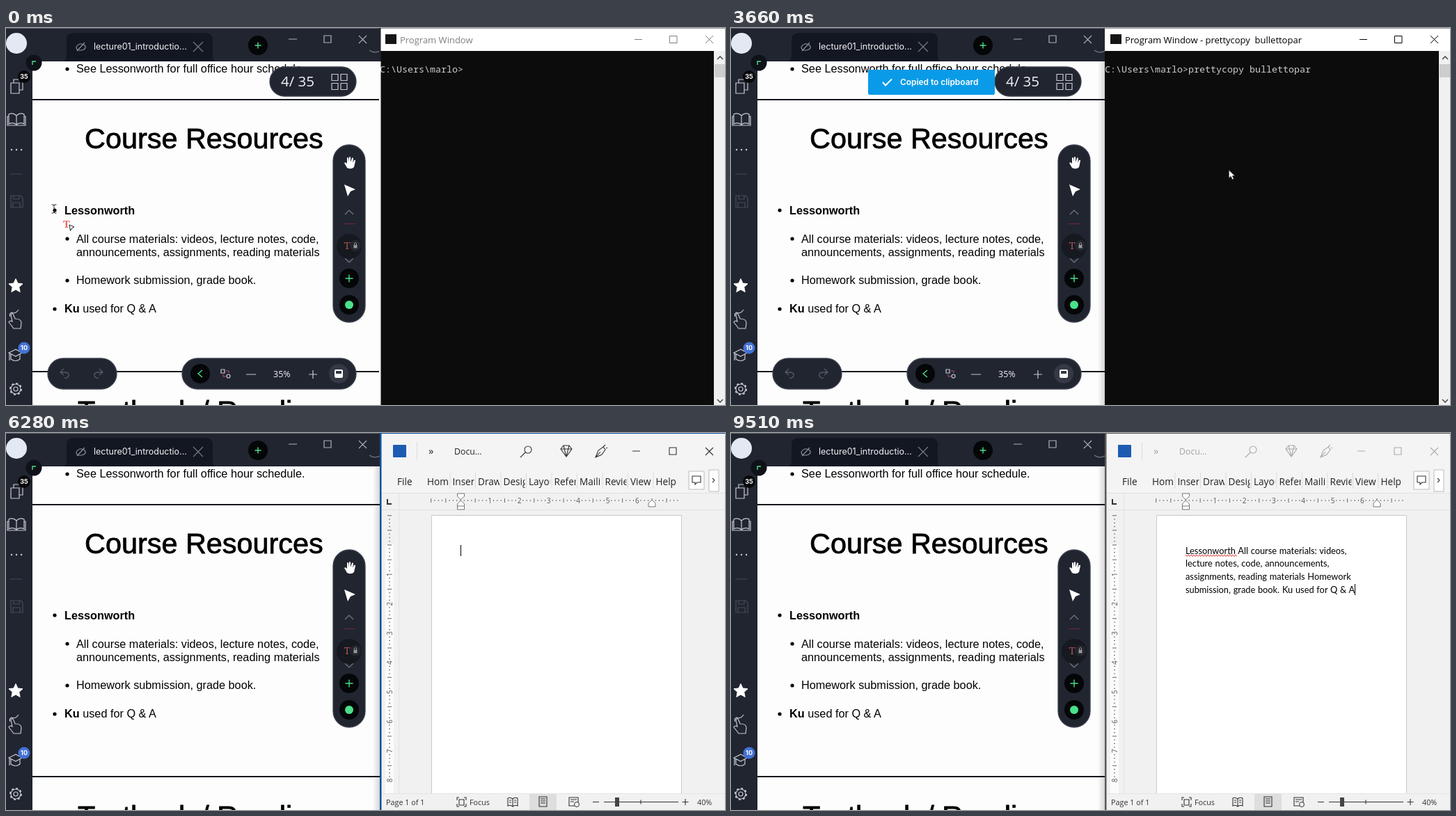
An HTML page that plays this animation: 1033x542 px, repeating every 9530 ms.

```html
<!DOCTYPE html>
<html lang="en">
<head>
<meta charset="utf-8">
<title>Bullets to paragraph</title>
<style>
html,body{margin:0;width:100%;height:100%;overflow:hidden;background:#fff}
svg{display:block}
text{white-space:pre}
.ui{font-family:"Open Sans","Noto Sans",sans-serif}
.slide{font:16.26px "Liberation Sans",Arial,sans-serif;fill:#000}
.mono{font:13.333px "Noto Sans Mono",monospace;fill:#ccc}
.doc{font:12.8px Lato,sans-serif;word-spacing:.5px}
.b{font-weight:700}
.u{text-decoration:underline}
.l{fill:none;stroke:#c6c9d0;stroke-width:1.2}
.d{fill:none;stroke:#333;stroke-width:1.1}
.dim{fill:none;stroke:#565b67;stroke-width:1.3}
.faint{stroke:#464b56}
.off{stroke:#aaa}
.g{fill:none;stroke:#4be08b;stroke-width:1.4}
.pill{fill:#212530;stroke:#3a3f4b;stroke-width:1.3}
.m{text-anchor:middle}
</style>
</head>
<body>
<svg id="stage" width="100%" height="100%" viewBox="0 0 1033 542">
<defs>
  <linearGradient id="fade"><stop offset="0" stop-opacity="0"/><stop offset="1" stop-opacity=".16"/></linearGradient>
  <filter id="soft" x="-10%" y="-10%" width="120%" height="120%"><feDropShadow dx="0" dy="1" stdDeviation="2" flood-opacity=".3"/></filter>
  <path id="chev" d="M-3-1.5L0 1.5L3-1.5"/>
</defs>

<!-- slide viewer -->
<rect width="539" height="542" fill="#fdfdfd"/>
<g class="slide">
  <path d="M38 103H537M38 494H537" stroke="#14171c" stroke-width="2.2"/>
  <text x="101" y="64">See Lessonworth for full office hour schedule.</text>
  <g font-size="41.4" stroke="#000" stroke-width=".8"><text x="113" y="173">Course Resources</text><text x="103" y="564.5">Textbook / Reading</text></g>
  <text x="84" y="268" class="b">Lessonworth</text>
  <text x="101" y="308.5">All course materials: videos, lecture notes, code,</text>
  <text x="101" y="328">announcements, assignments, reading materials</text>
  <text x="101" y="368">Homework submission, grade book.</text>
  <text x="84" y="409"><tspan class="b">Ku</tspan> used for Q &amp; A</text>
  <g id="dots"></g>
</g>
<g id="sel" fill="#5ca0cb" fill-opacity=".35"></g>
<rect id="shade" x="527" y="48" width="10" height="494" fill="url(#fade)"/>

<!-- viewer frame -->
<path d="M0 0H539V48H38V542H0Z" fill="#212530"/>
<path d="M0 .5H539" stroke="#5b5f68"/>
<path d="M82 48Q87 47 87 40V17Q87 7 97 7H286Q297 7 297 17V40Q297 47 302 48Z" fill="#131722"/>
<circle cx="15" cy="22" r="15" fill="#e3e9f3"/>
<circle cx="40" cy="50" r="11.5" fill="#0f1218"/>
<path class="g" d="M38 53V48H43"/>
<text x="126" y="31" font-family="Inter,sans-serif" font-size="12.5" fill="#f1f2f4">lecture01_introductio...</text>
<g class="l">
  <path stroke="#8b909b" d="M101 27Q107 19 114 26Q115 31 108 32H104Q101 31 101 27M102 33L113 21"/>
  <path stroke="#747985" d="M269 20L283 34M283 20L269 34M522 32Q529 37 537 33"/>
  <path stroke="#aeb2ba" d="M406 16H418M457 11H467V21H457ZM507 11L518 22M518 11L507 22"/>
  <path d="M7 79H19V94H7ZM11 79V74H24V89H19"/>
  <path d="M15 126Q10 121 4 124V138Q10 135 15 139Q20 135 26 138V124Q20 121 15 126V139M4 127H2V140H28V127H26"/>
  <path stroke-width="2.4" stroke-linecap="round" d="M8 175h.1M15 175h.1M22 175h.1"/>
  <path class="faint" d="M6 210H23M7 241H21L24 244V258H7ZM11 241V246H19V241M10 258V251H20V258"/>
  <path d="M8 428L4 423Q5 420 9 422L7 412Q9 409 11 413L13 418Q22 418 22 424L21 432H11ZM6 415Q4 411 8 409Q13 412 18 405"/>
  <path d="M4 467L14 462L23 467L14 472ZM7 469V476Q14 481 20 476V469M5 468V478"/>
  <circle cx="14" cy="519" r="3"/><circle cx="14" cy="519" r="7"/><circle cx="14" cy="519" r="8" stroke-width="2" stroke-dasharray="3 3.28"/>
</g>
<path id="star" fill="#fff" stroke="#fff" stroke-linejoin="round"/>
<circle cx="26" cy="70" r="9" fill="#07080a"/><circle cx="26" cy="460" r="8.5" fill="#4371d6"/>
<g class="m b" font-family="Inter,sans-serif" font-size="9" fill="#fff"><text x="26" y="73.3">35</text><text x="26" y="463.3">10</text></g>
<circle cx="362" cy="25" r="14" fill="#050608"/><path class="g" d="M357.500 25h9M362 20.500v9"/>

<!-- side tool palette -->
<rect class="pill" x="470" y="168" width="46" height="255" rx="23"/>
<path fill="#fff" d="M490 201L486 194Q488 192 490 195V187Q491 185 492 187V193L493 186Q494 184 495 186V193L497 187Q498 185 499 188L498 194L500 190Q502 189 502 191L500 200Q496 204 490 201ZM486 225L502 232L495 235L491 242Z"/>
<g fill="none" stroke-width="1.2"><path stroke="#747985" d="M487 268L493 262L499 268M487 331L493 337L499 331"/><path d="M485 281.500H502" stroke="#652836"/></g>
<circle cx="493" cy="314" r="18" fill="#161920"/>
<text class="m" x="490" y="318" font-family="Noto Serif,serif" font-size="15" fill="#a94f50">T</text>
<circle cx="502" cy="313" r="8" fill="#23262d"/><rect x="499.500" y="312" width="5" height="4.500" fill="#999"/><path d="M500.500 312V309.500Q502 307.500 503.500 309.500V312" fill="none" stroke="#999"/>
<g fill="#050608"><circle cx="493" cy="360" r="14"/><circle cx="493" cy="398" r="14"/></g>
<path class="g" d="M487.500 360h11M493 354.500v11"/>
<circle cx="493" cy="398" r="6" fill="#4be08b"/>

<!-- floating bars -->
<g id="bars">
  <rect class="pill" x="379" y="56" width="124" height="42" rx="21"/>
  <rect class="pill" x="60" y="475" width="99" height="44" rx="22"/>
  <rect class="pill" x="253" y="475" width="250" height="44" rx="22"/>
  <g class="ui" fill="#f2f3f5"><text x="395" y="84" font-size="20.500">4/ 35</text><text x="384" y="502" font-size="12.500">35%</text></g>
  <path class="l" d="M468 66.500h9v9h-9zM481 66.500h9v9h-9zM468 79.500h9v9h-9zM481 79.500h9v9h-9z"/>
  <path class="dim" d="M83 490L78 495L83 499M78 495H86Q91 496 90 500Q88 504 84 503M134 490L139 495L134 499M139 495H131Q126 496 127 500Q129 504 133 503"/>
  <circle cx="279" cy="497" r="14" fill="#050608"/><path class="g" d="M282 492L276 497L282 502"/>
  <path class="l" d="M309 491h5v5h-5zM317 500.500a2.500 2.500 0 1 0 5 0a2.500 2.500 0 1 0-5 0M345 498H359M435 498H447M441 492V504"/>
  <path d="M316 493h4v3M312 498v3h4" fill="none" stroke="#c34d61"/>
  <circle cx="478" cy="497" r="14" fill="#343945"/><rect x="472" y="491" width="12" height="12" rx="2" fill="#fff"/><path d="M474 493h8v4h-8z" fill="#343945"/>
</g>
<g id="toast">
  <rect x="197" y="60" width="182" height="36" rx="2" fill="#0a9be8"/>
  <path d="M218 78L222 82.500L231 73.500" fill="none" stroke="#fff" stroke-width="2"/>
  <text x="243" y="82" font-family="Inter,sans-serif" font-weight="600" font-size="11.900" fill="#fff">Copied to clipboard</text>
</g>

<!-- console -->
<g id="con">
  <rect x="537" width="496" height="33" fill="#fff"/><path d="M537 .5H1033" stroke="#999"/>
  <rect x="537" y="33" width="480" height="509" fill="#0c0c0c"/>
  <rect x="1017" y="33" width="16" height="509" fill="#f0f0f0"/><rect x="1018" y="52" width="15" height="19" fill="#cdcdcd"/>
  <path d="M1022 45L1026 41L1030 45M1022 534L1026 538L1030 534" fill="none" stroke="#505050" stroke-width="1.6"/>
  <rect x="545" y="9" width="16" height="14" fill="#161616"/>
  <g id="conHead">
    <text id="conTitle" class="ui" x="566" y="22" font-size="13"></text>
    <path d="M903 16.500H914M953.500 11.500H964V21.500H953.500ZM1005 11L1016 22M1016 11L1005 22" fill="none" stroke="#000"/>
  </g>
  <g class="mono" id="lines"></g>
  <rect id="caret" width="8" height="4" fill="#f2f2f2"/>
  <g id="lip"><rect x="536" width="2.500" height="48" fill="#212530"/><rect x="536" y="48" width="2.500" height="494" fill="#fdfdfd"/></g>
</g>

<!-- word processor -->
<g id="word">
  <rect x="538" width="495" height="542" fill="#f1f1f1"/><rect x="538" width="495" height="86" fill="#f4f4f4"/>
  <rect x="545" y="161" width="12" height="357" fill="#fbfbfb"/><path d="M564.500 87V518M540 110.500H1033M540 86.500H1033" stroke="#e1e1e1"/>
  <rect x="556" y="17" width="19" height="18" rx="1" fill="#1e5cb3"/><path d="M590.500 13V40" stroke="#ddd"/>
  <g id="wordHead" class="ui">
    <text x="607" y="31" font-size="15" fill="#222">»</text><text x="644" y="31" font-size="12.300" fill="#222">Docu...</text>
    <path class="d" d="M745 24a5 5 0 1 1 10 0a5 5 0 1 1-10 0M746.500 27.500L739 35M797 23L801 18H809L813 23L805 34ZM797 23H813M801 18L805 34L809 18M847 35L851 25L858 20L861 24L856 31ZM858 20L861 17M848 34L854 27M862 22L864 21M900 26H911M953 21h10v10h-10zM1005 21L1016 32M1016 21L1005 32"/>
  </g>
  <g id="tabs" class="ui" font-size="13.600" fill="#222"></g>
  <path d="M981 55h22v26h-22zM1010 53h14v31h-14z" fill="#fff" stroke="#bbb"/>
  <path class="d" d="M986 62H998V71H993L990 74V71H986ZM1015 65L1018 68L1015 71"/>
  <path d="M548 95V102H554" fill="none" stroke="#333" stroke-width="2"/>
  <g id="rule" class="ui m" font-size="10" fill="#555"></g>
  <path d="M611.500 518V118.500H970.500V518" fill="#fff" stroke="#c9c9c9"/>
  <g fill="#fff" stroke="#777"><path d="M648.500 87H658.500V91L653.500 96L648.500 91ZM653.500 97L658.500 102V110H648.500V102ZM648.500 105H658.500M928 96L933 101V106H923V101Z"/></g>
  <g id="pasted" class="doc">
    <text x="653" y="173.500">Lessonworth All course materials: videos,</text>
    <text x="653" y="192">lecture notes, code, announcements,</text>
    <text x="653" y="210.500">assignments, reading materials Homework</text>
    <text x="653" y="229.500">submission, grade book. Ku used for Q &amp; A</text>
  </g>
  <path id="squig" fill="none" stroke="#e03a3a"/>
  <path id="docCaret" stroke="#000"/>
  <rect x="538" y="518" width="495" height="24" fill="#f1f1f1"/><path d="M538 518.500H1033" stroke="#e4e4e4"/>
  <rect x="752" y="519" width="39" height="23" fill="#dedede"/>
  <g class="ui" font-size="10.800" fill="#333"><text x="546" y="535">Page 1 of 1</text><text x="666" y="535">Focus</text><text x="993" y="535">40%</text></g>
  <path class="d" d="M651 524H648V528M658 524H661V528M651 537H648V533M658 537H661V533M651 527h7v8h-7zM728 526Q724 523 721 525V536Q725 534 728 537Q731 534 735 536V525Q731 523 728 526V537M723 528h3M723 531h3M730 528h3M730 531h3M766 523h11v14h-11zM768 526h7M768 529h7M768 532h7M809 524h13v12h-13zM811 527h9M811 530h5M843 530.500h9M859 530.500H966M912 527.500v6M971.500 530.500h9M976 526v9"/>
  <circle cx="820" cy="534" r="3.500" fill="#f1f1f1" stroke="#333"/><rect x="875" y="524" width="6" height="13" fill="#444"/>
  <g id="rim"><rect x="537" width="2.500" height="542"/><rect x="537" width="496" height="1"/></g>
</g>

<!-- context menu -->
<g id="menu" class="ui" fill="#222">
  <g filter="url(#soft)" fill="#fff" stroke="#c8c8c8"><rect x="361.500" y="82.500" width="544" height="69"/><rect x="663.500" y="168.500" width="242" height="380"/></g>
  <path d="M366.500 88h111v25h-111zM481.500 88h48v25h-48zM669 174.500H900V204.500H669Z" fill="none" stroke="#777"/>
  <g font-size="12.300"><text x="369" y="105">Velandi (Body)</text><text x="483" y="105">24</text></g>
  <g font-size="17"><text x="536" y="106">A</text><text x="563" y="106" font-size="14">A</text><text x="621" y="108" font-size="20" font-style="italic">A</text></g>
  <g font-size="14"><text x="373" y="136" class="b">B</text><text x="400" y="136" font-style="italic" font-family="Noto Serif,serif">I</text><text x="423" y="135" class="u">U</text><text x="491" y="135">A</text></g>
  <path d="M447 138.500H463" stroke="#ffe800" stroke-width="4"/><path d="M488 138.500H505" stroke="#e81123" stroke-width="4"/>
  <path class="d" d="M548 94L550.500 91L553 94M573 91L575.500 94L578 91M450 133L453 127L460 122L462 125L456 132Z"/>
  <path d="M588 101L596 96L600 101L594 108Z" fill="#f2b366" stroke="#333"/><path class="d" d="M598 98L604 93M633 111Q639 110 639 105L647 95"/>
  <path d="M630 110Q633 104 640 105L638 111Z" fill="#2b7cd3"/>
  <path class="d" d="M535 125.500H546M535 131.500H546M535 137.500H546M577 125.500H588M577 131.500H588M577 137.500H588M831 92.500h24M831 98.500h24M831 104.500h24M831 110.500h24M871 92.500h24M874 98.500h18M871 104.500h24M874 110.500h18M769 92.500h15M769 98.500h15M769 104.500h15M769 110.500h15M676 93H699V106H686L681 111V106H676V100"/>
  <path d="M529 125.500h3M529 131.500h3M529 137.500h3M762 91V111M759 94L762 91L765 94M759 108L762 111L765 108" fill="none" stroke="#2b7cd3" stroke-width="1.600"/>
  <g class="m" font-size="6.500" fill="#2b7cd3"><text x="572.500" y="128">1</text><text x="572.500" y="134">2</text><text x="572.500" y="140">3</text></g>
  <path d="M674 93h9M678.500 88.500v9" stroke="#26914a" stroke-width="1.800"/>
  <g id="drops" class="d"></g>
  <path d="M612.500 86V147M660.500 86V147M718.500 86V147M699 343H904M699 408.500H904M699 539.500H904" stroke="#d2d2d2"/>
  <g class="m" font-size="11"><text x="632" y="135">Styles</text><text x="687" y="127">New</text><text x="687" y="143">Comment</text><text x="770" y="127">Line and</text><text x="770" y="143">Paragraph Spacing</text><text x="843" y="135">Justify</text><text x="883" y="135">Center</text></g>
  <text x="682" y="194" font-size="12.300" fill="#555">Search the menus</text>
  <g id="items" font-size="12.500"></g>
  <path class="d off" d="M682 218L689 230M691 218L684 230M680 232a2.500 2.500 0 1 0 5 0a2.500 2.500 0 1 0-5 0M688 232a2.500 2.500 0 1 0 5 0a2.500 2.500 0 1 0-5 0M678 249H687V262H678ZM684 252H691L694 255V265H684Z"/>
  <path d="M680 282H692V296H680ZM683 282v-2h6v2M715 334H707V314H722V321M711 314v-3h7v3" fill="none" stroke="#d9822b" stroke-width="1.700"/>
  <path d="M686 286h8v10h-8z" fill="#fff" stroke="#444"/>
  <g class="m"><text x="722.500" y="336" font-size="15">A</text><text x="686" y="367" font-size="18">A</text><text x="684" y="497" font-size="14">A</text><g class="b"><text x="690" y="524" font-size="10" fill="#17863a">あ</text><text x="682" y="530" font-size="11" fill="#1b65b8">a</text></g></g>
  <path class="d" d="M678 385.500h16M678 391.500h8M678 397.500h8M690 399V388H694M693 388V399M889 452L895 457.500L889 463"/>
  <path d="M683 423a5 5 0 1 1 10 0a5 5 0 1 1-10 0M684.500 427L679 433M691 486Q693 489 691 493M693 483Q697 489 693 495" fill="none" stroke="#2472c8" stroke-width="1.300"/>
</g>

<!-- pointers -->
<g id="ptr">
  <path id="arrow" d="M0 0V12L3 9.500L5 14L7.300 13L5.300 8.800H9Z" fill="#fff" stroke="#222" stroke-width=".9"/>
  <path id="beam" d="M-3.500-6H-1L0-5L1-6H3.500M0-5V5M-3.500 6H-1L0 5L1 6H3.500" fill="none" stroke="#222"/>
  <g id="hint"><text x="13" y="27" font-family="Noto Serif,serif" font-size="15" class="b" fill="#ec6a66">T</text><path d="M22 23L29 26L25.500 28L23.500 31.500Z" fill="#fff" stroke="#222"/></g>
</g>
</svg>
<script>
const $ = id => document.getElementById(id);
const LOOP = 9530;
const show = (id, on) => $(id).setAttribute('visibility', on ? 'visible' : 'hidden');
const set = (id, o) => { for (const k in o) $(id).setAttribute(k, o[k]); };
const clamp = (v, a, b) => Math.max(a, Math.min(b, v));
const ramp = (t, a, b) => clamp((t - a) / (b - a), 0, 1);

// still parts built by rule
$('dots').innerHTML = [[70, 262], [88, 303], [88, 363], [70, 404], [88, 59]]
  .map(([x, y]) => `<circle cx="${x}" cy="${y}" r="2.6"/>`).join('');
let star = 'M';
for (let i = 0; i < 10; i++) {
  const a = i * Math.PI / 5, r = i % 2 ? 5 : 10.5;
  star += `${14 + r * Math.sin(a)} ${371 - r * Math.cos(a)} `;
}
set('star', { d: star + 'Z' });

$('tabs').innerHTML = '<text x="562" y="75">File</text>' +
  ['Home', 'Insert', 'Draw', 'Design', 'Layout', 'References', 'Mailings', 'Review', 'View', 'Help'].map((s, i) => {
    const x = 605 + i * 36.5;
    return `<svg x="${x}" y="58" width="31" height="26"><text y="17">${s}</text></svg>` +
      (i < 9 ? `<path d="M${x + 33} 57V80" stroke="#ddd"/>` : '');
  }).join('');

let rule = '';
const inch = 42.3;
for (let i = -8; i <= 64; i++) {
  const n = i / 8, p = i * inch / 8;
  const h = i % 4 ? 1 : 3;
  const whole = i % 8 === 0 && i > 0;
  if (653 + p < 968)
    rule += whole && n < 7 ? `<text x="${653 + p}" y="101">${n}</text>` : `<path d="M${653 + p} ${97 - h}v${2 * h}" stroke="#666"/>`;
  if (161 + p < 516)
    rule += whole ? `<text transform="translate(555 ${161 + p})rotate(-90)">${n}</text>` : `<path d="M${551 - h} ${161 + p}h${2 * h}" stroke="#666"/>`;
}
$('rule').innerHTML = rule;

$('drops').innerHTML = [[472, 101], [523, 101], [474, 132], [515, 132], [557, 132], [598, 132], [650, 101], [789, 101]]
  .map(([x, y]) => `<use href="#chev" x="${x}" y="${y}"/>`).join('');
// "_" marks the access key
$('items').innerHTML = [['Cu_t', 230, '#aaa'], ['_Copy', 262, '#aaa'], ['Paste Options:', 296, '#222', 'b'], ['_Font...', 365],
  ['_Paragraph...', 397], ['Searc_h', 431], ['S_ynonyms', 463], ['_Read Aloud', 495], ['Tran_slate', 527]]
  .map(([s, y, c = '#222', k = '']) =>
    `<text x="704" y="${y}" fill="${c}" class="${k}">${s.replace(/_(.)/, '<tspan class="u">$1</tspan>')}</text>`).join('');

let sq = 'M653 175';
for (let x = 655, k = 0; x <= 727; x += 2, k++) sq += `L${x} ${k % 2 ? 175 : 177.5}`;
set('squig', { d: sq });

const rows = [[66, 244, 121, 31], [84, 286, 368, 29], [102, 315, 350, 16], [84, 346, 279, 30], [66, 387, 149, 30]];
$('sel').innerHTML = rows.map(([x, y, , h]) => `<rect x="${x}" y="${y}" height="${h}"/>`).join('');

const prompt = 'C:\\Users\\marlo&gt;', cmd = 'prettycopy bullettopar';
const out = ['Lessonworth All course materials: videos, lecture notes, co',
  'de, announcements, assignments, reading materials Homework',
  'submission, grade book. Ku used for Q &amp; A'];
const line = i => 64 + i * 17.5;
$('lines').innerHTML = `<text x="537" y="64">${prompt}<tspan id="cmd">${cmd}</tspan></text><g id="out">` +
  out.map((s, i) => `<text x="537" y="${line(i + 1)}">${s}</text>`).join('') +
  `</g><text id="next" x="537" y="${line(5)}">${prompt}</text>`;

// moments at which the screen refreshes
const ticks = [0, 250, 380, 510, 640, 760, 910, 1040, 1150, 1280, 1550, 1690, 1830, 1950, 2070, 2630, 2800, 2980, 3160,
  3660, 3800, 3920, 4050, 4170, 4690, 5070, 5350, 5540, 5720, 5880, 6280, 6680, 6790, 6920, 7050, 7200, 7340, 7490, 7630,
  7770, 7900, 8030, 8160, 8290, 8420, 8550, 8830, 8970, 9110, 9250, 9390, 9510];
// pointer path: time, x, y
const path = [[0, 69, 260], [250, 72, 262], [760, 234, 413], [1550, 234, 413], [1830, 687, 178], [2070, 688, 176], [6280, 760, 250],
  [6680, 720, 225], [6920, 663, 168], [7050, 700, 283], [7200, 716, 320], [7630, 716, 322], [8290, 840, 470], [8830, 840, 470], [9250, 980, 535]];
// console caret: from, to, column, line
const blinks = [[2070, 2630, 15, 0], [2630, 2800, 37, 0], [3160, 3660, 0, 1], [4170, 4690, 0, 1], [5350, 5540, 15, 5], [5880, 6280, 15, 5]];

function pointer(t) {
  const i = path.findIndex(p => p[0] > t);
  if (i < 0) return path[path.length - 1].slice(1);
  const a = path[i - 1], b = path[i], k = ramp(t, a[0], b[0]);
  return [a[1] + (b[1] - a[1]) * k, a[2] + (b[2] - a[2]) * k];
}

function draw(now) {
  const time = now % LOOP;
  const t = ticks.filter(s => s <= time + 4).pop();
  const [x, y] = pointer(t);

  show('ptr', t < 5540 || (t >= 6680 && t < 9250));
  set('ptr', { transform: `translate(${x} ${y})` });
  const inPage = (t >= 6680 && t < 6920) || t >= 7630;
  const beam = t < 760 || inPage;
  set('beam', { opacity: beam ? 1 : 0 });
  set('arrow', { opacity: beam ? 0 : 1 });
  set('hint', { opacity: t < 760 ? 1 : 0 });

  show('sel', t >= 250 && t < 1550);
  rows.forEach(([rx, ry, w, h], i) => {
    const full = t >= 760 || y > ry + h;
    $('sel').children[i].setAttribute('width', full ? w : y > ry ? clamp(x - rx, 0, w) : 0);
  });
  const gone = 1 - ramp(t, 3660, 4170);
  set('bars', { opacity: gone });
  set('toast', { opacity: Math.min(gone, ramp(t, 1550, 1690) * .6 + ramp(t, 1690, 1830) * .33 + ramp(t, 1830, 1950) * .07) });

  const focus = t >= 2070, running = t >= 3160 && t < 5350;
  show('shade', focus);
  show('lip', !focus);
  set('conHead', { opacity: focus ? 1 : .5 });
  $('conTitle').textContent = 'Program Window' + (running ? ' - prettycopy  bullettopar' : '');
  show('cmd', t >= 2630);
  show('out', t >= 5070);
  show('next', t >= 5350);
  const c = blinks.find(b => t >= b[0] && t < b[1]);
  show('caret', c);
  if (c) set('caret', { x: 537 + c[2] * 8, y: line(c[3]) - .5 });

  const word = t >= 6280, pasted = t >= 7630, away = t >= 9250;
  set('word', { display: word ? 'inline' : 'none' });
  set('con', { display: word ? 'none' : 'inline' });
  set('wordHead', { opacity: away ? .38 : 1 });
  set('rim', { fill: away ? '#5a5a5a' : '#0f529f' });
  show('menu', t >= 6920 && t < 7630);
  show('pasted', word && pasted);
  show('squig', word && t >= 7900);
  show('docCaret', word && (!pasted || Math.floor((t - 7630) / 530) % 2 === 0 || away));
  set('docCaret', { d: pasted ? 'M896.500 217V233' : 'M653.500 161V177' });
}

const start = performance.now();
(function tick() {
  draw(performance.now() - start);
  requestAnimationFrame(tick);
})();
</script>
</body>
</html>
```
